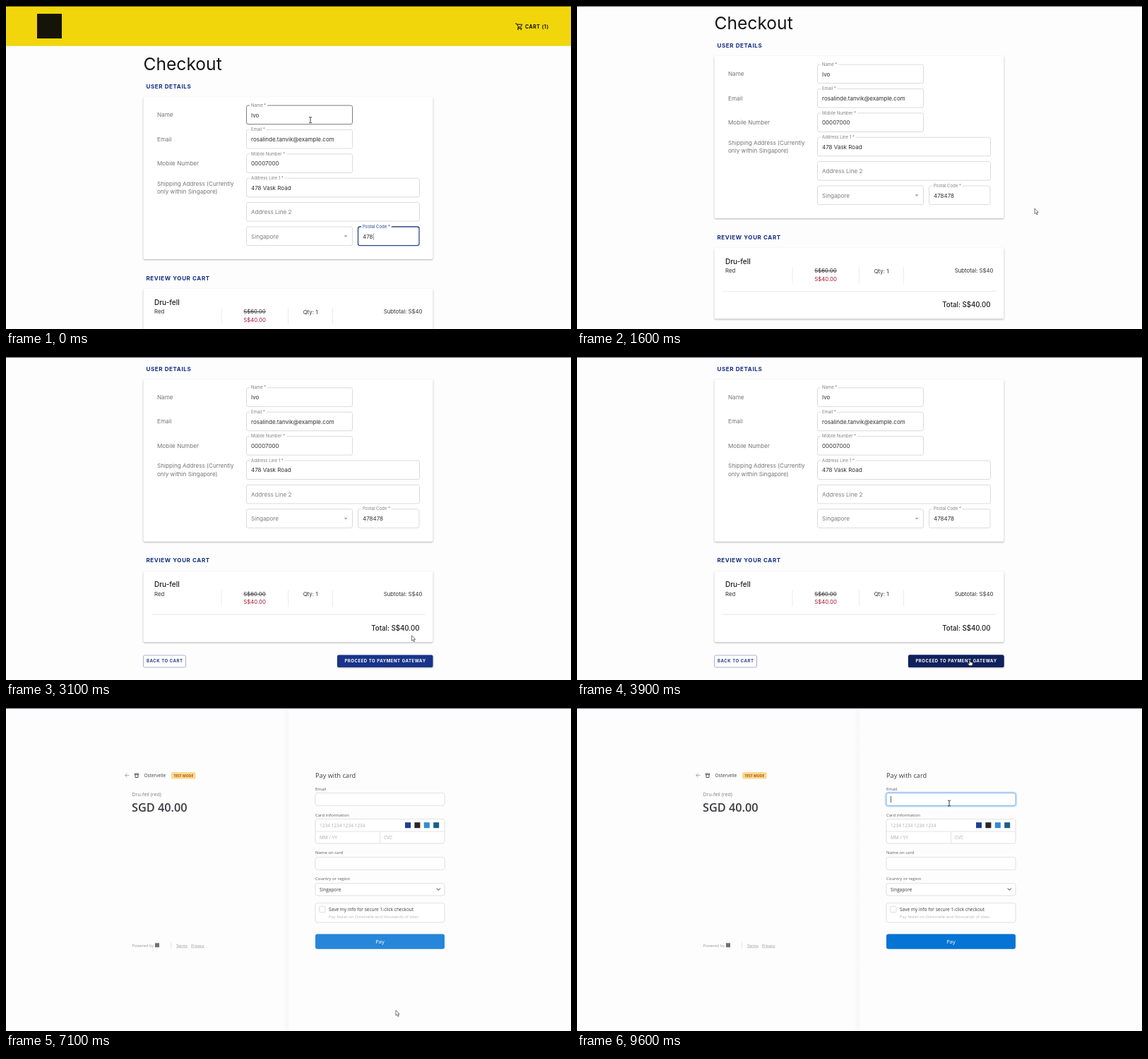
An HTML page that plays this animation: 800 px wide and 458 px high, repeating every 9.7 s.

```html
<!DOCTYPE html>
<html lang="en">
<head>
<meta charset="utf-8">
<title>Checkout</title>
<style>
  html, body { margin: 0; width: 100%; height: 100%; overflow: hidden; background: #fefdfe; }
  svg { display: block; width: 100vw; height: 100vh; }
  text { white-space: pre; }

  #shop { font: 8px Inter, sans-serif; fill: #303034; }
  .title { font-size: 24.6px; fill: #151515; }
  .head { font-weight: 700; letter-spacing: .62px; fill: #102d80; }
  .cart { font-size: 7px; font-weight: 700; letter-spacing: .5px; fill: #111; }
  .name { font-size: 8.15px; fill: #747478; }
  .hint { font-size: 8.15px; fill: #7e7e82; }
  .float { font-size: 6px; fill: #808084; stroke: #fff; stroke-width: 5px; paint-order: stroke; }
  .line { fill: none; stroke: #dbdbde; }
  .card { fill: #fff; filter: drop-shadow(0 1px 1.3px rgba(0, 0, 0, .3)); }
  .rule { stroke: #ececee; }
  .item { font-size: 10px; font-weight: 500; fill: #1c1c20; }
  .total { font-size: 9.7px; font-weight: 500; fill: #1c1c20; }
  .small { font-size: 7.8px; }
  .old { text-decoration: line-through; }
  .sale { fill: #a3122f; }
  .btn { font-size: 6px; font-weight: 700; letter-spacing: .55px; text-anchor: middle; fill: #fff; }
  .btn.out { fill: #283f8f; }
  .end { text-anchor: end; }
  .mid { text-anchor: middle; }
  .hover .line { stroke: #7c7c80; }
  .focus .line { stroke: #28458f; stroke-width: 1.3px; }
  .focus .float { fill: #28458f; }

  #pay, #bones { font: 6.5px "Open Sans", "Noto Sans", sans-serif; fill: #3c3c40; }
  .h { font-size: 9.2px; font-weight: 500; }
  .price { font-size: 16.3px; font-weight: 600; }
  .label { font-size: 6px; fill: #58585c; }
  .ph { fill: #adadb1; }
  .sub { font-size: 7px; fill: #7c7c80; }
  .note { font-size: 5.8px; fill: #b6b6ba; }
  .foot { font-size: 5.6px; fill: #98989c; }
  .link { text-decoration: underline; }
  .badge { font-size: 5px; font-weight: 700; fill: #a4570f; }
  .cta { font-size: 7.4px; fill: #fff; }
  .field { fill: #fff; stroke: #e2e2e5; filter: drop-shadow(0 .5px .6px rgba(0, 0, 0, .08)); }
  .thin { fill: none; stroke: #e4e4e7; }
  .icon { fill: none; stroke-linecap: round; stroke-linejoin: round; }
</style>
</head>
<body>
<svg id="stage" viewBox="0 0 800 458" preserveAspectRatio="none"></svg>
<script>
const LOOP = 9700, STEP = 100;
const stage = document.getElementById('stage');

const text = (x, y, s, cls = '') => `<text x="${x}" y="${y}" class="${cls}">${s}</text>`;
const rect = (x, y, w, h, r = 0, attrs = '') =>
  `<rect x="${x}" y="${y}" width="${w}" height="${h}" rx="${r}" ${attrs}/>`;
const path = (d, attrs) => `<path d="${d}" ${attrs}/>`;
const group = (id, body) => `<g id="${id}">${body}</g>`;

// Outlined input with an optional label set into its border
function input(id, x, row, w, value, label, cls = '') {
  const y = 141 + 34.4 * row;
  return group(id, rect(x, y, w, 26.6, 2.5, 'class="line"') +
    (label ? text(x + 6.5, y + 1.7, label + ' *', 'float') : '') +
    text(x + 6.5, y + 16.5, value, cls));
}

const shop = group('shop',
  rect(0, 0, 800, 56.7, 0, 'fill="#f0d60a"') +
  rect(44, 11, 35, 35, 0, 'fill="#151408"') +
  path('M721.5 25h1.7l2.3 4.8h3.4l1.9-3.6h-6.8M725.5 29.8l-.9 1.7h5.6', 'class="icon" stroke="#151408"') +
  '<circle cx="725" cy="33.2" r=".9" fill="#151408"/><circle cx="729.4" cy="33.2" r=".9" fill="#151408"/>' +
  text(735, 31.5, 'CART (1)', 'cart') +
  text(194.5, 90.5, 'Checkout', 'title') +
  text(198.5, 117.3, 'USER DETAILS', 'head') +
  rect(194.5, 129, 410, 230, 2, 'class="card"') +
  text(214, 157.3, 'Name', 'name') +
  text(214, 191.7, 'Email', 'name') +
  text(214, 226.1, 'Mobile Number', 'name') +
  text(214, 254.8, 'Shipping Address (Currently', 'name') +
  text(214, 266, 'only within Singapore)', 'name') +
  input('user', 340.5, 0, 150, 'Ivo', 'Name') +
  input('mail', 340.5, 1, 150, 'rosalinde.tanvik@example.com', 'Email') +
  input('phone', 340.5, 2, 150, '00007000', 'Mobile Number') +
  input('road', 340.5, 3, 245, '478 Vask Road', 'Address Line 1') +
  input('road2', 340.5, 4, 245, 'Address Line 2', '', 'hint') +
  input('land', 340.5, 5, 150, 'Singapore', '', 'hint') +
  path('M478.5 325.3h5l-2.5 2.6z', 'fill="#a2a2a6"') +
  input('postal', 498.5, 5, 86.5, '<tspan id="code"></tspan><tspan id="caret" font-weight="300">|</tspan>', 'Postal Code') +
  text(198.5, 388.5, 'REVIEW YOUR CART', 'head') +
  rect(194.5, 401, 410, 100.5, 2, 'class="card"') +
  text(210, 423.6, 'Dru-fell', 'item') +
  text(210, 436.2, 'Red', 'small') +
  text(352, 436.2, 'S$60.00', 'small mid old') +
  text(352, 447.6, 'S$40.00', 'small mid sale') +
  text(431, 436.7, 'Qty: 1', 'small mid') +
  text(589.5, 436.2, 'Subtotal: S$40', 'small end') +
  path('M305 428v23M399.5 428v23M462.5 428v23', 'class="rule"') +
  path('M206 462.5H594', 'class="rule" stroke-width="1.2"') +
  text(585.5, 485, 'Total: S$40.00', 'total end') +
  rect(194.5, 520.3, 60, 17, 2, 'fill="#fff" stroke="#a9b1cf"') +
  text(224.8, 530.7, 'BACK TO CART', 'btn out') +
  rect(469, 519.8, 135.5, 17.6, 2, 'fill="#183389" style="filter:drop-shadow(0 1px 1px rgba(0,0,0,.3))"') +
  rect(469, 519.8, 135.5, 17.6, 2, 'id="dark" fill="#0f215c"') +
  text(537, 530.7, 'PROCEED TO PAYMENT GATEWAY', 'btn'));

const backdrop = x =>
  rect(0, 0, 800, 458, 0, 'fill="#fefdfe"') +
  rect(x - 9, 0, 9, 458, 0, 'fill="url(#edge)"');
const backArrow = path('M174 95.5h-5M171.2 93l-2.6 2.5 2.6 2.5', 'class="icon" stroke="#a2a2a6" stroke-width=".9"');
const powered = (y, ink) =>
  text(178.5, y, 'Powered by', 'foot') + rect(211, y - 5.3, 6, 6, 0, `fill="${ink}"`);

const bone = (x, y, w, h, r) => rect(x, y, w, h, r, 'fill="url(#bone)"');
const bones = group('bones', backdrop(407) + group('shapes',
  backArrow +
  bone(178.7, 88.2, 13.6, 13.6, 6.8) +
  bone(178.5, 118, 41.5, 7.5, 3.7) +
  bone(178.5, 133, 59.5, 11.5, 5.7) +
  bone(178.5, 175, 90.5, 89, 4) +
  bone(440, 88, 76.5, 12.5, 6.2) +
  [[120, 18], [156, 35], [209.5, 18], [246, 35], [295, 21]]
    .map(([y, h]) => bone(440, y, 182, h, 3)).join('') +
  powered(345.2, '#58585c')));

const field = (y, h) => rect(438, y, 183, h, 3, 'class="field"');
const pay = group('pay', backdrop(400) + backArrow +
  path('M182.5 93h5v1.6h-5zM183 95v3.5h4v-3.5', 'class="icon" stroke="#55555a"') +
  text(195.5, 98, 'Ostervelle') +
  rect(234, 91, 34.5, 9.5, 2, 'fill="#fdd98e"') +
  text(251.3, 97.6, 'TEST MODE', 'badge mid') +
  text(178.5, 125.3, 'Dru-fell (red)', 'sub') +
  text(178, 146.5, 'SGD 40.00', 'price') +
  powered(338.6, '#707074') +
  path('M233.5 332v9', 'class="thin"') +
  text(241, 338.6, 'Terms', 'foot link') +
  text(262, 338.6, 'Privacy', 'foot link') +
  text(438, 98.8, 'Pay with card', 'h') +
  text(438, 116.7, 'Email', 'label') +
  field(120.5, 18) +
  group('ring',
    rect(437, 119.5, 185, 20, 4, 'fill="none" stroke="#cfe2f8" stroke-width="2.6"') +
    rect(438, 120.5, 183, 18, 3, 'fill="#fff" stroke="#7fb4ea"') +
    path('M444.5 125v9', 'stroke="#333" stroke-width=".8"')) +
  text(438, 153.6, 'Card information', 'label') +
  field(157.5, 34.5) +
  path('M438 175H621M529.5 175V192', 'class="thin"') +
  text(444, 168.7, '1234 1234 1234 1234', 'ph') +
  text(444, 185.9, 'MM / YY', 'ph') +
  text(535, 185.9, 'CVC', 'ph') +
  ['#1d3f8f', '#2b2528', '#2f8bd6', '#1b5c86']
    .map((c, i) => rect(565 + 13.4 * i, 162.2, 8, 8, 0, `fill="${c}"`)).join('') +
  text(438, 207.3, 'Name on card', 'label') +
  field(211.5, 18) +
  text(438, 244.3, 'Country or region', 'label') +
  field(248.5, 17.5) +
  text(444, 259.6, 'Singapore') +
  path('M610 256l2.3 2.4 2.3-2.4', 'class="icon" stroke="#333"') +
  field(276.5, 27.5) +
  rect(443.5, 281.2, 8.5, 8.5, 1.5, 'fill="#fff" stroke="#dcdce0"') +
  text(457, 288, 'Save my info for secure 1-click checkout') +
  text(457, 298, 'Pay faster on Ostervelle and thousands of sites.', 'note') +
  rect(438, 320.5, 183, 21.3, 3, 'id="submit" fill="#0674d4"') +
  text(529.5, 334, 'Pay', 'cta mid'));

const pointer = group('pointer',
  group('arrow', path('M0 0V7.6L1.7 6L2.9 8.9L4.2 8.3L3 5.6H5.2Z', 'fill="#fff" stroke="#55555a" stroke-width=".8"')) +
  group('beam', path('M-2-4Q0-4 0-3Q0-4 2-4M0-3V3.2M-2 4.2Q0 4.2 0 3.2Q0 4.2 2 4.2', 'fill="none" stroke="#222" stroke-width=".9"')) +
  group('hand', path('M-.8 1Q0-.2.8 1V4L3.6 4.8Q4.6 5.2 4.3 6.4L3.6 9.2H-.6L-2.9 6.2Q-2.6 5-.8 6.3Z', 'fill="#fff" stroke="#222" stroke-width=".8"')));

stage.innerHTML = `<defs>
  <linearGradient id="bone"><stop stop-color="#f6f5f6"/><stop offset=".55" stop-color="#f0eff0"/><stop offset="1" stop-color="#f2f1f2"/></linearGradient>
  <linearGradient id="edge"><stop stop-color="#fefdfe"/><stop offset="1" stop-color="#f7f6f8"/></linearGradient>
</defs>` + shop + bones + pay + rect(0, 0, 800, 1, 0, 'fill="#141423" opacity=".68"') + pointer;

const el = id => document.getElementById(id);
const show = (id, on) => { el(id).style.display = on ? '' : 'none'; };
const fade = (id, value) => { el(id).style.opacity = value; };

// Linear interpolation through [time, ...values] keys
function at(t, keys) {
  const i = keys.findIndex(k => k[0] > t);
  if (i < 0) return keys[keys.length - 1].slice(1);
  if (i === 0) return keys[0].slice(1);
  const a = keys[i - 1], b = keys[i], p = (t - a[0]) / (b[0] - a[0]);
  return a.slice(1).map((v, n) => v + (b[n + 1] - v) * p);
}

const route = [
  [0, 431, 161.5], [700, 431, 161.5], [900, 496, 206], [1200, 648, 287], [1700, 648, 287],
  [2300, 609, 323.5], [2700, 599, 350], [3400, 556, 428.5], [5000, 556, 428.5],
  [5100, 552, 428.5], [7900, 552, 428.5], [8100, 549, 425], [8300, 549, 425], [8900, 527, 135]
];
const scroll = [[1400, 0], [1500, 5.5], [1600, 58], [1700, 97.3]];
const keystrokes = [100, 300, 400];

function draw(t) {
  el('shop').setAttribute('transform', `translate(0 ${-at(t, scroll)[0]})`);
  el('code').textContent = '478478'.slice(0, 3 + keystrokes.filter(k => t >= k).length);
  el('user').classList.toggle('hover', t < 900);
  el('postal').classList.toggle('focus', t < 1300);
  show('caret', t < 1300);
  fade('dark', at(t, [[3200, 0], [3500, 1]])[0]);

  show('shop', t < 5100);
  show('bones', t >= 5100 && t < 6800);
  fade('shapes', at(t, [[5100, 0], [5300, 1]])[0]);
  show('pay', t >= 6800);
  fade('submit', at(t, [[6800, .6], [7100, .87], [7700, 1]])[0]);
  fade('ring', at(t, [[9000, 0], [9200, 1]])[0]);

  const beam = t < 900 || t >= 8900, hand = t >= 3300 && t < 5100;
  show('beam', beam);
  show('hand', hand);
  show('arrow', !beam && !hand);
  el('pointer').setAttribute('transform', `translate(${at(t, route).join(' ')})`);
}

const start = performance.now();
function tick() {
  const t = (performance.now() - start) % LOOP;
  draw(Math.floor(t / STEP) * STEP);
  requestAnimationFrame(tick);
}
tick();
</script>
</body>
</html>
```
